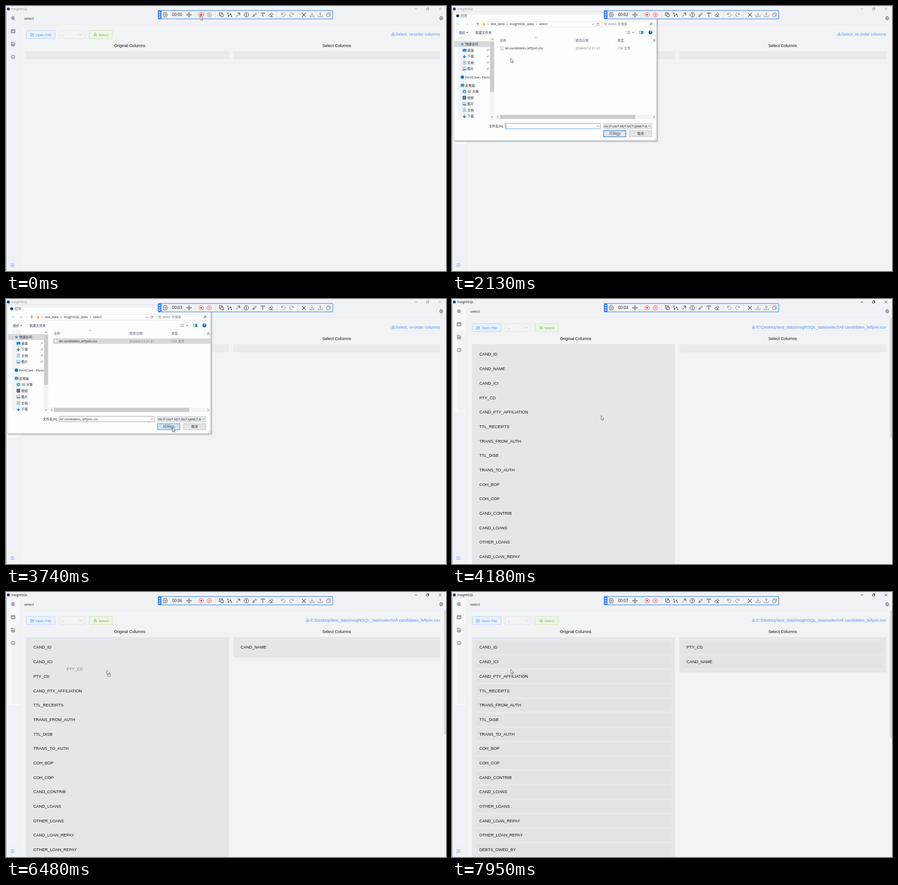
An HTML page for the animation above (8000 ms loop, 965 by 581 pixels).

```html
<!DOCTYPE html>
<html lang="en">
<head>
<meta charset="utf-8">
<title>Select columns</title>
<style>
html, body { margin: 0; width: 965px; height: 581px; overflow: hidden; background: #f1f2f5; }
svg { display: block; }
text { white-space: pre; font-family: "Liberation Sans", Arial, sans-serif; }
.ui { font-family: "Open Sans", "Noto Sans CJK SC", "Noto Sans CJK", sans-serif; }
</style>
</head>
<body>
<svg width="965" height="581" viewBox="0 0 965 581">
  <clipPath id="nav"><rect x="4" y="68" width="79" height="180"/></clipPath>
  <clipPath id="head"><rect x="436" y="68" width="12" height="14"/></clipPath>
  <clipPath id="type"><rect x="333" y="257" width="95" height="12"/></clipPath>
  <g id="frame"></g>
  <g id="app"></g>
  <g id="dialog"></g>
  <g id="bar"></g>
  <g id="pointer"></g>
</svg>
<script>
const LOOP = 8000;
const BLUE = '#4f94f8';
const $ = id => document.getElementById(id);

// drawing helpers; text is placed by its vertical centre
const rect = (x, y, w, h, fill, stroke = 'none', sw = 0.8, rx = 0) =>
  `<rect x="${x}" y="${y}" width="${w}" height="${h}" fill="${fill}" stroke="${stroke}" stroke-width="${sw}" rx="${rx}"/>`;
const circle = (x, y, r, fill, stroke = 'none', sw = 0.9) =>
  `<circle cx="${x}" cy="${y}" r="${r}" fill="${fill}" stroke="${stroke}" stroke-width="${sw}"/>`;
const line = (d, stroke = '#333', sw = 0.9, fill = 'none') =>
  `<path d="${d}" fill="${fill}" stroke="${stroke}" stroke-width="${sw}" stroke-linejoin="round" stroke-linecap="round"/>`;
const at = (x, y, body) => `<g transform="translate(${x} ${y})">${body}</g>`;
const clip = (id, body) => `<g clip-path="url(#${id})">${body}</g>`;
const text = (x, y, str, size = 9, fill = '#111', more = '') =>
  `<text x="${x}" y="${y + size * 0.355}" font-size="${size}" fill="${fill}" ${more}>${str}</text>`;
const ui = (x, y, str, fill = '#222', size = 7.05, more = '') =>
  text(x, y, str, size, fill, 'class="ui" ' + more);
const MIDDLE = 'text-anchor="middle"', END = 'text-anchor="end"';
const chevron = (x, y, dir, stroke = '#555', s = 2) => {
  const d = { down: `M${-s} ${-s / 2}L0 ${s / 2}L${s} ${-s / 2}`, up: `M${-s} ${s / 2}L0 ${-s / 2}L${s} ${s / 2}`,
    left: `M${s / 2} ${-s}L${-s / 2} 0L${s / 2} ${s}`, right: `M${-s / 2} ${-s}L${s / 2} 0L${-s / 2} ${s}` }[dir];
  return at(x, y, line(d, stroke));
};
const gear = (x, y, s, stroke) => at(x, y,
  line(`M${-s} 0L${-s * 0.75} ${-s * 0.5}L${-s * 0.5} ${-s}H${s * 0.5}L${s * 0.75} ${-s * 0.5}L${s} 0L${s * 0.75} ${s * 0.5}L${s * 0.5} ${s}H${-s * 0.5}L${-s * 0.75} ${s * 0.5}Z`, stroke)
  + circle(0, 0, s * 0.38, 'none', stroke));
const clover = (x, y, stroke) => at(x, y,
  circle(0, -1.9, 1.6, 'none', stroke, 0.8) + circle(-2, 1.7, 1.6, 'none', stroke, 0.8) + circle(2, 1.7, 1.6, 'none', stroke, 0.8));
const folder = (x, y, stroke) => at(x, y, line('M-3 3V-2.8H-.8L.2-1.6H2.6V-.3M-3 3L-1.8-.3H3.6L2.5 3Z', stroke, 0.8));

// bursts of picture changes: first time, last time, count
const BURSTS = [[0, 0, 1], [90, 800, 8], [920, 1140, 3], [1300, 1550, 3], [1670, 1860, 3], [2000, 2000, 1],
  [2130, 2440, 4], [2630, 3350, 8], [3490, 3490, 1], [3740, 3740, 1], [3930, 3930, 1], [4090, 4820, 8],
  [5040, 5040, 1], [5190, 5300, 2], [5540, 6250, 8], [6370, 6480, 2], [6740, 6740, 1], [6880, 7130, 3],
  [7330, 7670, 4], [7810, 7950, 2]];
const TICKS = BURSTS.flatMap(([a, b, n]) =>
  Array.from({ length: n }, (_, i) => n > 1 ? Math.round(a + (b - a) * i / (n - 1)) : a));

// pointer path: time, x, y
const PATH = [[0, 426, 22], [90, 420, 32], [300, 340, 85], [500, 235, 130], [640, 165, 138], [800, 90, 95],
  [1030, 74, 62], [1140, 71, 58], [1550, 71, 58], [1670, 85, 95], [1860, 120, 180], [2000, 131, 150],
  [2130, 129, 115], [2440, 145, 96], [2630, 150, 90], [2836, 152, 90], [3144, 300, 245], [3247, 342, 287],
  [3350, 365, 282], [3930, 365, 282], [4500, 230, 190], [4820, 156, 154], [5040, 500, 118], [5190, 668, 115],
  [5300, 680, 118], [5540, 640, 125], [6250, 160, 178], [6370, 148, 180], [6480, 221, 172], [6740, 600, 118],
  [6880, 645, 112], [7130, 655, 110], [7330, 560, 120], [7670, 163, 161], [7810, 133, 168], [7950, 129, 170]];
const SECONDS = [920, 2000, 2930, 4090, 5190, 6020, 7000];

const COLUMNS = ['CAND_ID', 'CAND_NAME', 'CAND_ICI', 'PTY_CD', 'CAND_PTY_AFFILIATION', 'TTL_RECEIPTS',
  'TRANS_FROM_AUTH', 'TTL_DISB', 'TRANS_TO_AUTH', 'COH_BOP', 'COH_COP', 'CAND_CONTRIB', 'CAND_LOANS',
  'OTHER_LOANS', 'CAND_LOAN_REPAY', 'OTHER_LOAN_REPAY', 'DEBTS_OWED_BY'];
const ROW = 31.68;

function pointerAt(t) {
  const i = PATH.findIndex(p => p[0] > t);
  if (i < 0) return PATH[PATH.length - 1].slice(1);
  const [a, ax, ay] = PATH[i - 1], [b, bx, by] = PATH[i];
  const k = (t - a) / (b - a);
  return [ax + (bx - ax) * k, ay + (by - ay) * k];
}

function drawFrame() {
  return rect(0, 0, 965, 581, '#f1f2f5') + rect(32, 42, 929, 539, '#f2f3f5')
    + line('M31.5 13V581M32 41H965M1 557H31', '#e7e9ec', 0.8)
    + line('M.4 12V581', '#7d8188', 0.8)
    + at(14, 568, line('M-3.7-3H3.3M-3.7 0H1M-3.7 3H3.3M3-1L4 0L3 1', BLUE))
    + gear(954.5, 26.8, 3.6, '#333');
}

function drawSide() {
  const ink = '#444';
  return at(15.5, 27, circle(-0.5, -0.5, 3.3, 'none', ink) + line('M2 2L4.2 4.2M-2-.5H1M-.5-2V1', ink))
    + at(15.5, 55.3, rect(-4, -3.5, 8, 7, 'none', ink, 0.9) + line('M-4-1.8H4M-1.4-.3L-2.5 1L-1.4 2.2M1.4-.3L2.5 1L1.4 2.2', ink, 0.7))
    + at(15.5, 83.5, line('M-3.3-4H1.2L3.4-1.8V4H-3.3ZM-1.5 2V0M0 2V-1.5M1.6 2V.5', ink))
    + at(15.5, 111.8, circle(0, 0, 4, 'none', ink) + line('M0-.4V2M0-2V-1.9', ink));
}

function list(x, w, names, striped, height) {
  let out = rect(x, 99, w, height, names.length ? '#e5e6e9' : '#e9eaec', 'none', 0, 1);
  names.forEach((name, i) => {
    const y = 121.3 + ROW * i;
    if (striped) out += rect(x + 9, y + 14, w - 18, 4, '#e8e9ec') + rect(x + 9, y - 13, w - 18, 27, '#e2e3e6');
    out += text(x + 16, y, name);
  });
  return out;
}

function drawApp(t, [px, py]) {
  const active = (t >= 1300 && t < 1550) || t >= 3930;
  const hover = t >= 1030 && t < 2000;
  const loaded = t >= 3930;
  const ink = active ? '#111' : '#8b8e94';
  const label = hover ? '#fff' : BLUE;
  const right = t < 5190 ? [] : t < 6740 ? ['CAND_NAME'] : ['PTY_CD', 'CAND_NAME'];
  const gone = t < 5040 ? [] : t < 6740 ? ['CAND_NAME'] : ['PTY_CD', 'CAND_NAME'];
  const left = loaded ? COLUMNS.filter(c => !gone.includes(c)).slice(0, 15) : [];
  const ghost = t >= 5040 && t < 5300 ? ['CAND_NAME', 96, 1] : t >= 6480 && t < 6880 ? ['PTY_CD', 88, 3] : null;
  let out = circle(5, 6.5, 3.2, '#173f7d') + ui(12, 6.5, 'InsightSQL', ink, 7.1)
    + line('M896.5 6.5H901.5M949.2 3.8L954.4 9M954.4 3.8L949.2 9', ink, 0.8)
    + at(925, 6.3, line('M-2.5-1.2H1.3V2.7H-2.5ZM-1.2-1.4V-2.6H2.6V1.3H1.5', ink, 0.8));
  if (loaded) out += rect(4, 15, 27, 233, '#f7f8f9') + rect(13, 70, 18, 175, '#f2f3f5');
  out += drawSide() + text(40, 27, 'select', 8, '#333')
    + rect(44.4, 53.8, 63.3, 17.8, hover ? '#579bf8' : '#e9f1fc', hover ? '#579bf8' : '#abcbf8', 0.8, 1.5)
    + folder(57.2, 62.8, label) + text(65, 62.8, 'Open File', 7.85, label)
    + rect(116.8, 53.8, 56, 17.8, '#f2f3f5', '#e0e2e6', 0.8, 1.5) + text(123.5, 62, ',', 8, '#555')
    + chevron(163, 63, 'down', '#b3b6bc', 2.6)
    + rect(182.4, 53.8, 50.8, 17.8, '#eff6e8', '#bddda5', 0.8, 1.5)
    + clover(195.5, 62.5, '#79b544') + text(202.5, 62.8, 'Select', 8, '#79b544')
    + clover(loaded ? 661.5 : 849.2, 62, BLUE)
    + text(952, 62.3, loaded ? 'E:\\Desktop\\test_data\\insightSQL_data\\select\\All candidates_leftjoin.csv' : 'Select, re-order columns', 9, BLUE, END)
    + text(271.3, 87.3, 'Original Columns', 9, '#111', MIDDLE)
    + text(725.3, 87.3, 'Select Columns', 9, '#111', MIDDLE)
    + list(44, 445, left, t >= 6880, loaded ? 482 : 18)
    + list(498.5, 454, right, t >= 6880, [18, 45, 77][right.length]);
  if (t >= 4090) out += rect(961, 41, 4, [263, 271, 280][right.length], '#d3d5d9', 'none', 0, 1);
  if (ghost) out += text(px - ghost[1], py - ghost[2], ghost[0], 9, '#111', 'opacity=".5"');
  return out;
}

const PLACES = {
  star: line('M0-3.6L1-1.2L3.6-1L1.6.7L2.3 3.3L0 1.9L-2.3 3.3L-1.6.7L-3.6-1L-1-1.2Z', 'none', 0, '#2f96e0'),
  desk: rect(-4, -3, 8.5, 6, '#1a8fe3'),
  down: line('M0-3V2.6M-2.8 0L0 3L2.8 0', '#2b7cd3', 1.7),
  doc: rect(-3, -3.8, 6, 7.6, '#eef3f7', '#8ea2b3') + line('M-1.3-1.6H1.4M-1.3 0H1.4M-1.3 1.6H1.4', '#5b89b5', 0.8),
  pic: rect(-4, -3, 8, 6, '#d6e8f5', '#7a9db8') + line('M-3.5 2.5L-1 0L1 1.4L3.5 .4V2.5Z', 'none', 0, '#2c78b5'),
  cloud: circle(0, 0, 3.7, '#1272c8'),
  pc: rect(-3, -3, 7, 5, '#3a94d6', '#6d7f8c') + line('M-3.5 3H2', '#78838b', 1.2),
  cube: line('M0-4L3.8-2V2.4L0 4L-3.8 2.4V-2Z', 'none', 0, '#22a3bf') + rect(-1.2, -1.4, 2.6, 3.6, '#b5edf5'),
  film: rect(-3.8, -4, 7.6, 8, '#4a4f5e') + rect(-2, -3, 4, 6, '#6c87ad')
};
const NAV = [['star', '快速访问', 83.5], ['desk', '桌面', 97], ['down', '下载', 110.5], ['doc', '文档', 124.2], ['pic', '图片', 137.8],
  ['cloud', 'FernCove - Perso', 156], ['pc', '此电脑', 174], ['cube', '3D 对象', 187.5], ['film', '视频', 201], ['pic', '图片', 214.7],
  ['doc', '文档', 228.2], ['down', '下载', 241.8]];
const ROOTS = ['star', 'cloud', 'pc'];

function navRow([icon, name, y], i) {
  const root = ROOTS.includes(icon);
  const pin = i > 0 && i < 5 ? at(78.3, y, line('M-2.4 2.4L-.4.4M-1.6-1L1 1.6M-.6-.8L1.2-2.4L2.4-1.2L.9.7', '#7f868c', 0.8)) : '';
  return at(root ? 22.7 : 27.2, y, PLACES[icon]) + ui(root ? 29 : 33.6, y, name) + pin;
}

function drawDialog(t) {
  if (t < 2000 || t >= 3930) return '';
  const picked = t >= 2836;
  const rowFill = t >= 3740 ? '#d9d9d9' : picked ? '#cce8ff' : t >= 2600 ? '#e5f3ff' : 'none';
  const openFill = t >= 3490 ? '#cce4f7' : t >= 3247 ? '#e5f1fb' : '#e4e5e6';
  const grey = '#6d7178', head = '#4c607a', pale = '#c3c6c9', thumb = '#cbcccd';
  const shadow = [4, 3, 2, 1].map(s => rect(4, 14, 445 + s, 281 + s, 'rgba(0,0,0,.07)', 'none', 0, 1)).join('');
  return rect(2, 14, 30, 289, '#fafbfb') + shadow
    + rect(3.5, 13, 445.5, 282, '#fcfdfd', '#b9bdc0', 0.7) + rect(13, 13, 320, 6, '#f1f3f4')
    // title, address and tool rows
    + circle(12.5, 21.5, 3.3, '#173f7d') + ui(19.5, 21.5, '打开')
    + line('M18.5 40H12.5M14.5 38L12.5 40L14.5 42M29 40H35M33 38L35 40L33 42', pale, 0.8)
    + chevron(45, 40, 'down', pale, 1.2) + line('M56.5 43V37M54 39.5L56.5 37L59 39.5', '#555')
    + rect(64.5, 34, 263.5, 12, '#fff', '#dfe1e3') + rect(67.5, 36.5, 4, 6.5, '#f7cf62') + rect(70, 39, 2, 4, '#e0ab32')
    + [79.3, 120.8, 185.2].map(x => chevron(x, 40, 'right', '#555', 1.5)).join('')
    + ui(85, 39.5, 'test_data') + ui(126.5, 39.5, 'insightSQL_data') + ui(191, 39.5, 'select')
    + chevron(309, 40, 'down', '#555', 1.9) + at(319.7, 40, line('M2-1.6A2.6 2.6 0 1 0 2.6.5M2.3-3V-1.2H.6', '#555', 0.8))
    + rect(330.5, 34, 113, 12, '#fff', '#dfe1e3') + ui(333.5, 39.5, '在 select 中搜索', grey)
    + at(436.5, 39.5, circle(0.6, -0.6, 2, 'none', '#333') + line('M-.9 .9L-3 3', '#333'))
    + ui(15, 58, '组织', '#1d3557') + line('M31.5 57.2H35L33.2 59.2Z', 'none', 0, '#333') + ui(51.5, 58, '新建文件夹', '#1d3557')
    + line('M382 55.5H383M382 58H383M382 60.5H383M385 55.5H390M385 58H390M385 60.5H390', '#8a9096', 1)
    + line('M395.5 57.2H399L397.2 59.2Z', 'none', 0, '#333')
    + rect(411, 55, 8, 6, '#fff', '#4994d0', 0.9) + rect(415, 55, 4, 6, '#2e84cf')
    + circle(435.2, 58, 4.2, '#0b63b5') + ui(435.2, 58, '?', '#fff', 6.5, MIDDLE + ' font-weight="bold"')
    // places
    + rect(13, 67, 18.5, 178, '#f3f4f5') + rect(5, 77, 78, 13, '#d8d9da')
    + clip('nav', NAV.map(navRow).join(''))
    + rect(83, 68, 9.5, 181, '#f3f3f4') + rect(83.3, 78, 9, 110.5, thumb) + chevron(88, 73, 'up') + chevron(88, 243.3, 'down')
    // files
    + line('M268.5 68V82M360 68V82M436.8 68V82', '#e3e5e7', 0.8) + chevron(184, 69, 'up', '#8a9096')
    + ui(105, 75, '名称', head) + ui(271, 75, '修改日期', head) + ui(363, 75, '类型', head) + clip('head', ui(440, 75, '大小', head))
    + rect(103, 86.3, 345.5, 12, rowFill)
    + at(109.5, 92.2, line('M-2.9-3.9H1.4L3-2.2V3.9H-2.9Z', '#a7adb2', 0.7, '#f6f7f8') + line('M-1.4-1H1.5M-1.4.6H1.5M-1.4 2.2H1.5', '#c3c8cc', 0.6))
    + ui(116.3, 92, 'All candidates_leftjoin.csv') + ui(271, 92, '2024/2/12 21:21', grey, 7.2) + ui(363, 92, 'CSV 文件', grey)
    + rect(96, 238.5, 352, 9.5, '#f3f3f4') + rect(105, 238.7, 297, 9, thumb) + chevron(100, 243.3, 'left') + chevron(443.5, 243.3, 'right')
    // name, type and buttons
    + ui(113.5, 263.3, '文件名(N):', '#222', 7.05, END)
    + rect(116.5, 257.3, 208.5, 11.8, '#fff', picked ? '#8b8f93' : '#3c8fd8', 0.9)
    + (picked ? ui(118, 263.2, 'All candidates_leftjoin.csv') : line('M118.8 260V267', '#222', 0.7)) + chevron(320, 263.3, 'down', '#555', 1.6)
    + rect(332.4, 257.3, 105.6, 11.8, '#e6e7e8', '#bfc2c4')
    + clip('type', ui(333.5, 263.2, 'csv (*.csv;*.txt;*.tsv;*.spext;*.dat)', '#222', 6.5))
    + chevron(433, 263.3, 'down', '#555', 1.6)
    + rect(332.6, 273.3, 48.8, 13.4, openFill, '#2880cc', t >= 3247 ? 0.9 : 1.3)
    + ui(357, 279.8, '打开(<tspan text-decoration="underline">O</tspan>)', '#222', 7.05, MIDDLE)
    + rect(389.2, 273.3, 48.8, 13.4, '#e4e5e6', '#b4b7b9') + ui(413.5, 279.8, '取消', '#222', 7.05, MIDDLE)
    + line('M447.5 290L444 293.5M447.5 292L446 293.5', '#a5a9ac', 0.8);
}

function drawBar(t) {
  const rec = t >= 90, red = '#f0412c', ink = '#333', dim = '#74777c';
  const pauseInk = rec ? red : dim;
  const seconds = SECONDS.filter(s => s <= t).length;
  const nodes = [[-3.9, -3.3], [-2.8, 3.2], [2.2, -1.4], [3.9, 3.4]];
  return rect(333.6, 9.9, 383, 18.4, '#f2f3f5', '#3f86f4', 1.3, 1.5) + rect(333.2, 9.6, 7.8, 19, '#3f86f4', 'none', 0, 1)
    + [14.2, 19.2, 24.2].map(y => circle(337, y, 1.3, '#fff')).join('')
    + gear(349.3, 19.2, 4.9, ink) + ui(375.3, 19.1, '00:0' + seconds, '#111', 8.7, MIDDLE)
    + at(401.3, 19.3, line('M-5 0H5M0-5V5M-3.6-1.6L-5.2 0L-3.6 1.6M3.6-1.6L5.2 0L3.6 1.6M-1.6-3.6L0-5.2L1.6-3.6M-1.6 3.6L0 5.2L1.6 3.6', ink))
    + line('M414.5 11V27.5M459.5 11V27.5M594.5 11V27.5M639.5 11V27.5', '#d3d5d9', 0.8)
    + (rec ? '' : rect(419.5, 11.5, 17, 15.5, '#e6e7e9'))
    + circle(428, 19.3, 4.9, 'none', red) + (rec ? rect(426.2, 17.5, 3.6, 3.6, red) : circle(428, 19.3, 2.3, red))
    + circle(446, 19.3, 4.9, 'none', pauseInk) + line('M444.8 17.3V21.3M447.3 17.3V21.3', pauseInk, 1)
    + at(472.5, 19.3, rect(-4.3, -4.3, 6.4, 6, 'none', ink, 1) + circle(1.4, 1.2, 3.4, '#f2f3f5', ink, 1))
    + at(490.5, 19.3, line('M' + nodes.join('L'), ink) + nodes.map(p => circle(...p, 1.1, ink)).join(''))
    + at(509, 19.3, line('M-3.8 3.8L3.8-3.8M-1-3.8H3.8V1', ink, 1))
    + circle(527.2, 19.3, 4.8, 'none', ink, 1) + line('M526.2 17.6L527.4 16.8V22', ink, 1)
    + at(545.2, 19.3, line('M-4 4L-3.2 1.2L2.4-4.2L4.2-2.4L-1.4 3.2ZM-2.4.5L-.6 2.3', ink))
    + line('M559.5 17V15.3H567.3V17M563.4 15.3V23.5', ink, 1)
    + at(581.3, 19.3, line('M-4.6 1.2L1-4.2L4.4-1L-.8 4H-2ZM-2-1.2L1.6 2M-1 4.2H4', ink))
    + at(608, 19.3, line('M-3.8-3.8V-1H-1M-3.6-1.2A4 4 0 1 1-1.2 3.8', dim))
    + at(626.3, 19.3, line('M3.8-3.8V-1H1M3.6-1.2A4 4 0 1 0 1.2 3.8', dim))
    + line('M649.5 15.6L657 23.1M657 15.6L649.5 23.1', ink, 1.1)
    + at(671.2, 19.3, line('M0-4.4V1.6M-2-.5L0 1.6L2-.5M-4.4 1V4.2H4.4V1', dim))
    + at(689.3, 19.3, line('M-4.4 1V4.2H4.4V1M0 2V-1', dim) + circle(0, -2.7, 1.7, 'none', dim))
    + at(707.3, 19.3, rect(-4.2, -2.3, 6.4, 6.4, 'none', dim, 0.9, 1) + line('M-2-2.5V-4.2H4.2V2H2.4', dim));
}

function drawPointer(t, [x, y]) {
  if (t >= 1030 && t < 1670) return at(x, y,
    line('M2 6V1Q2.8 0 3.6 1V4Q8 4 8.2 6V8.5L7 11H3L.3 7.4Q.3 6 2 7.2Z', '#333', 0.7, '#fff'));
  const drag = (t >= 5040 && t < 5300) || (t >= 6480 && t < 6880);
  return at(x, y, line('M0 0V8.8L2.1 7L3.6 10.2L4.9 9.6L3.5 6.6H6.2Z', '#333', 0.7, '#fff')
    + (drag ? rect(2.5, 8.2, 5.4, 4.6, '#fff', '#444', 0.8) : ''));
}

$('frame').innerHTML = drawFrame();
let shown = -1;
function draw(now) {
  const t = now % LOOP;
  const tick = TICKS.filter(v => v <= t).pop();
  if (tick === shown) return;
  shown = tick;
  const p = pointerAt(tick);
  $('app').innerHTML = drawApp(tick, p);
  $('dialog').innerHTML = drawDialog(tick);
  $('bar').innerHTML = drawBar(tick);
  $('pointer').innerHTML = drawPointer(tick, p);
}
const start = performance.now();
function loop() {
  draw(performance.now() - start);
  requestAnimationFrame(loop);
}
loop();
</script>
</body>
</html>
```
